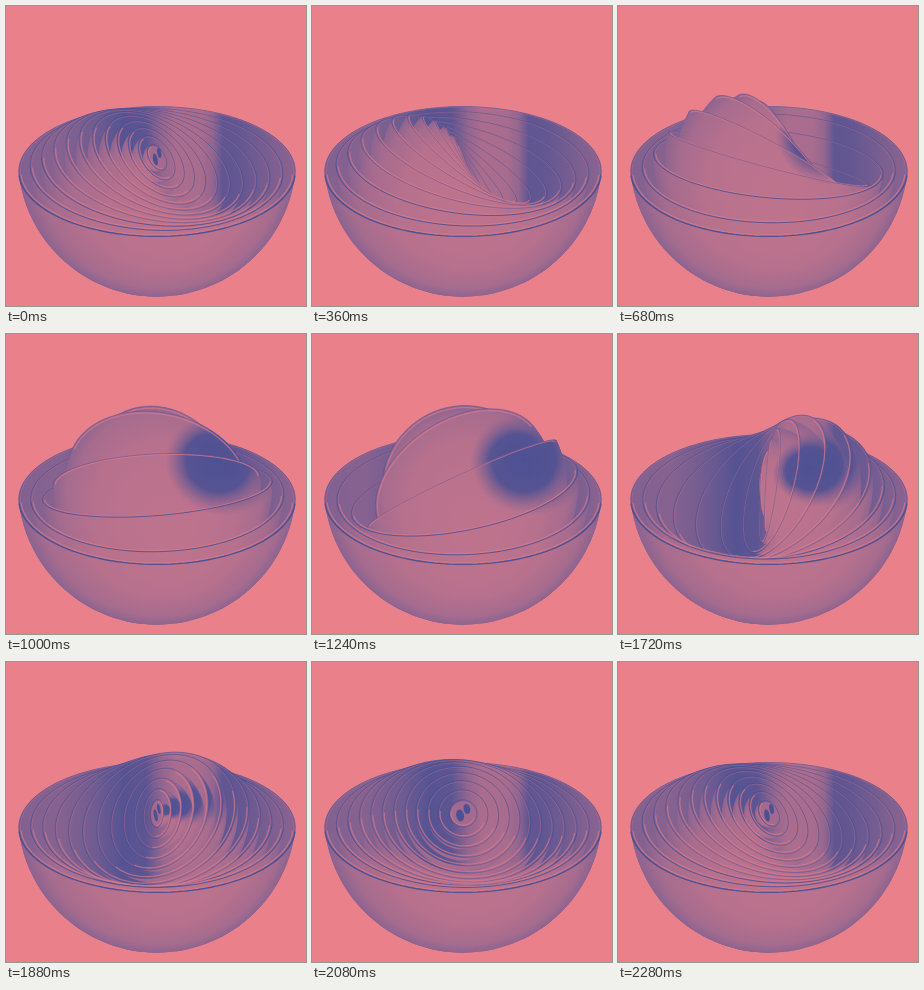
An HTML page with a canvas for the animation above (2.32 s loop, 300 by 300 pixels).

```html
<!DOCTYPE html>
<html lang="en">
<head>
<meta charset="utf-8">
<title>Nested bowls</title>
<style>
  html, body { margin: 0; width: 100%; height: 100%; overflow: hidden; background: #e9808a; }
  canvas { display: block; width: 100vw; height: 100vh; }
</style>
</head>
<body>
<canvas id="stage" width="300" height="300"></canvas>
<script>
const ctx = document.getElementById('stage').getContext('2d');
const LOOP = 2320, STEP = 40, TAU = Math.PI * 2, DEG = Math.PI / 180;
const CX = 151, CY = 151.5, DIST = 557;
const COUNT = 12, R_MAX = 135, R_MIN = 14;
const TILT = 27.3 * DEG;
const UP = [0, Math.cos(TILT), Math.sin(TILT)];
const PINK = [233, 128, 138], BLUE = [62, 76, 148];

// Two-tone palette: 0 is the background pink, 1 the deep blue.
function tone(k, alpha = 1) {
  const c = PINK.map((v, i) => Math.round(v + (BLUE[i] - v) * k));
  return `rgba(${c.join()},${alpha})`;
}

function addStops(grad, stops) {
  for (const [at, k, alpha] of stops) grad.addColorStop(at, tone(k, alpha));
  return grad;
}

function project([x, y, z]) {
  const k = DIST / (DIST - z);
  return [CX + x * k, CY - y * k];
}

function slerp(a, b, g) {
  const w = Math.acos(a[0] * b[0] + a[1] * b[1] + a[2] * b[2]);
  const p = Math.sin((1 - g) * w) / Math.sin(w), q = Math.sin(g * w) / Math.sin(w);
  return a.map((v, i) => v * p + b[i] * q);
}

// Inner bowls turn about the screen's vertical and lag at the back; outer ones stay upright.
function facing(u, t) {
  const front = (1 + Math.cos(TAU * (t - 70) / LOOP)) / 2;
  const turn = TAU * (t + 240) / LOOP + (28 - 150 * u * (1 - front)) * DEG;
  const reach = 0.36 + 0.6 * front * front;
  const power = 2.9 - 1.4 * front;
  const g = 1 - Math.exp(-Math.pow(u / reach, power));
  return slerp(UP, [Math.sin(turn), 0, Math.cos(turn)], g);
}

function makeBowl(i, t) {
  const u = i / (COUNT - 1), r = R_MAX + (R_MIN - R_MAX) * u;
  const n = facing(u, t);
  const q = Math.hypot(n[0], n[1]) || 1e-6;
  const m = [-n[0] / q, -n[1] / q], e = [-m[1], m[0]];
  const s0 = Math.asin(Math.min(1, r / (DIST * q)));
  const b0 = Math.atan2(n[2] * Math.sin(s0), Math.cos(s0));
  const zs = r * r / DIST, rs = Math.sqrt(r * r - zs * zs);
  const rim = (s, rad = r) => {
    const a = rad * Math.cos(s), b = rad * Math.sin(s);
    return project([e[0] * a + m[0] * b * n[2], e[1] * a + m[1] * b * n[2], b * q]);
  };
  const edge = b => {
    const x = rs * Math.cos(b), y = rs * Math.sin(b);
    return project([e[0] * x + m[0] * y, e[1] * x + m[1] * y, zs]);
  };
  return { i, u, r, n, s0, b0, rim, edge };
}

function arc(fn, from, to) {
  const out = [];
  for (let k = 0; k <= 64; k++) out.push(fn(from + (to - from) * k / 64));
  return out;
}

function trace(points) {
  ctx.beginPath();
  points.forEach(p => ctx.lineTo(p[0], p[1]));
}

function line(points, color, width) {
  trace(points);
  ctx.strokeStyle = color;
  ctx.lineWidth = width;
  ctx.stroke();
}

const insidePaint = addStops(ctx.createLinearGradient(12, 0, 290, 0), [
  [0, 0.6], [0.15, 0.58], [0.27, 0.7], [0.38, 0.86], [0.46, 0.82], [0.52, 0.5],
  [0.57, 0.36], [0.66, 0.38], [0.7, 0.5], [0.735, 0.8], [0.8, 0.78], [0.93, 0.62], [1, 0.55]
]);

function outsidePaint(r) {
  const g = ctx.createRadialGradient(CX + r * 0.12, CY + r * 0.4, r * 0.15, CX, CY, r * 1.05);
  return addStops(g, [[0, 0.25], [0.55, 0.29], [0.85, 0.4], [1, 0.58]]);
}

function spotPaint(r) {
  const x = CX + r * 0.6, y = CY - r * 0.25;
  const g = ctx.createRadialGradient(x, y, 0, x, y, r * 0.52);
  return addStops(g, [[0, 0.95, 0.95], [0.6, 0.92, 0.9], [0.82, 0.8, 0.4], [1, 0.7, 0]]);
}

function drawInside(b) {
  const from = Math.PI - b.s0, to = TAU + b.s0;
  trace([...arc(b.rim, from, to), ...arc(b.edge, b.b0, Math.PI - b.b0)]);
  ctx.fillStyle = insidePaint;
  ctx.fill();
  line(arc(b.rim, from, to), tone(0.95, 0.6), 1);
  line(arc(s => b.rim(s, b.r - 1.4), from, to), tone(0.3, 0.5), 0.8);
}

function drawOutside(b) {
  const from = b.s0, to = Math.PI - b.s0;
  trace([...arc(b.rim, from, to), ...arc(b.edge, Math.PI - b.b0, b.b0)]);
  ctx.fillStyle = outsidePaint(b.r);
  ctx.fill();
  if (b.i) {
    ctx.fillStyle = spotPaint(b.r);
    ctx.fill();
  }
  if (to - from < 0.01) return;
  line(arc(s => b.rim(s, b.r - 2), from, to), tone(0.12, 0.7), 1.3);
  line(arc(b.rim, from, to), tone(1, b.u < 0.25 ? 0.85 : 0.45), b.i ? 0.9 : 1.4);
}

function drawHub(b) {
  const face = b.n[2];
  if (face < 0.05) return;
  trace(arc(s => b.rim(s, 12.5), 0, TAU));
  ctx.fillStyle = tone(0.42);
  ctx.fill();
  ctx.fillStyle = tone(0.92);
  for (const [x, y, rx, ry] of [[-3, 2, 4, 6], [4, -4.5, 3.4, 5]]) {
    ctx.beginPath();
    ctx.ellipse(CX + x * face, CY + y, rx * face, ry, -0.2, 0, TAU);
    ctx.fill();
  }
}

function draw(t) {
  ctx.fillStyle = tone(0);
  ctx.fillRect(0, 0, 300, 300);
  ctx.lineJoin = 'round';
  const bowls = Array.from({ length: COUNT }, (_, i) => makeBowl(i, t));
  bowls.forEach(drawInside);
  drawHub(bowls[COUNT - 1]);
  bowls.reverse().forEach(drawOutside);
}

function tick() {
  const t = performance.now() % LOOP;
  draw(Math.floor(t / STEP) * STEP);
  requestAnimationFrame(tick);
}
tick();
</script>
</body>
</html>
```
